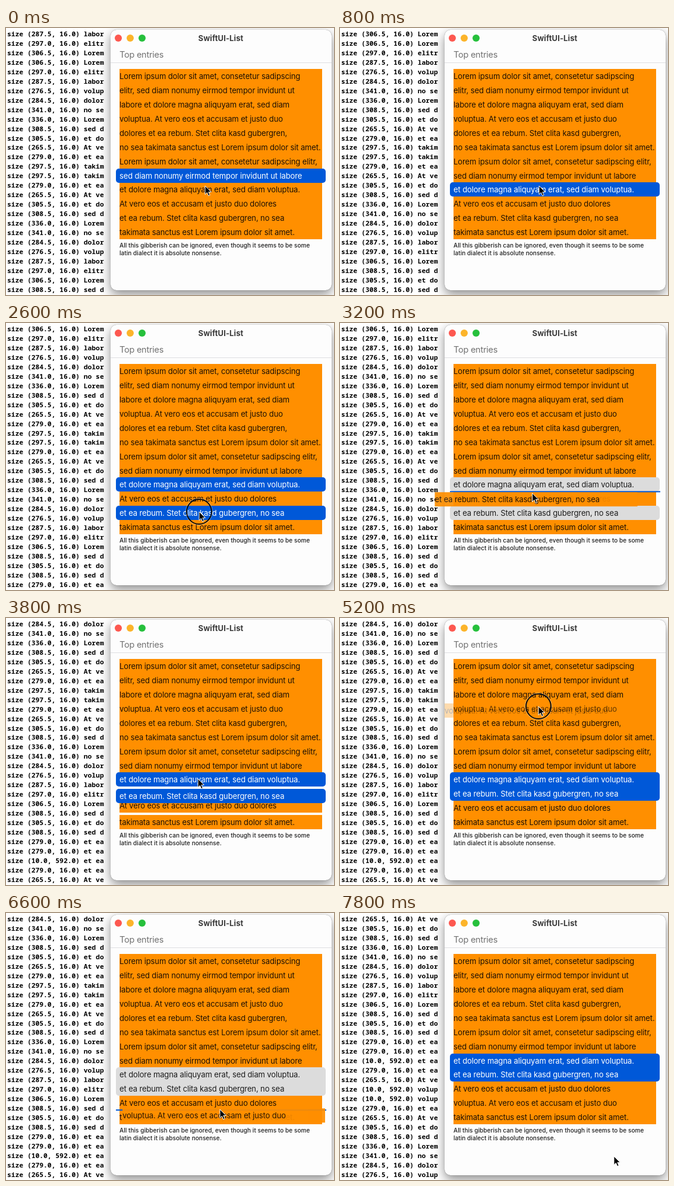
An HTML page that plays this animation: 552x450 px, repeating every 8 s.

```html
<!DOCTYPE html>
<html lang="en">
<head>
<meta charset="utf-8">
<title>List reordering</title>
<style>
  html, body { margin: 0; width: 100%; height: 100%; overflow: hidden; background: #fff; }
  #stage { position: relative; width: 552px; height: 450px; overflow: hidden; font-family: Inter, "Open Sans", sans-serif; color: #1c1004; }
  #stage div, #log, svg { position: absolute; white-space: pre; }
  #log { left: 2px; top: 2.2px; margin: 0; color: #000; font: bold 11.3px/15.93px "Noto Sans Mono", monospace; }
  #window {
    left: 176px; top: 3px; width: 372px; height: 439px; border-radius: 10px; background: #fdfdfd;
    box-shadow: 0 0 1px rgba(0, 0, 0, .5), 0 7px 18px rgba(0, 0, 0, .45);
  }
  .light { top: 11px; width: 12px; height: 12px; border-radius: 50%; }
  #title { left: 176px; width: 371px; top: 7px; text-align: center; font: bold 13px/20px Inter, sans-serif; letter-spacing: .1px; color: #3a3a3a; }
  #heading { left: 191px; top: 35px; font-size: 14.5px; line-height: 20px; letter-spacing: -.25px; color: #727272; }
  #rule { left: 176px; top: 58px; width: 372px; height: 1px; background: #dedee2; }
  .row { left: 191px; top: 0; width: 341px; height: 24px; background: #ff8f00; font-size: 13px; line-height: 24px; letter-spacing: -.12px; }
  .row.picked { left: 185px; width: 347px; padding-left: 6px; z-index: 1; border-radius: 5px; background: #0058d8; color: #fff; }
  .row.idle { background: #dcdcdc; color: #1c1c1c; }
  .row.joinUp { border-top-left-radius: 0; border-top-right-radius: 0; }
  .row.joinDown { border-bottom-left-radius: 0; border-bottom-right-radius: 0; }
  #note { left: 191px; top: 359.5px; font-size: 10px; font-weight: 500; line-height: 13px; letter-spacing: .05px; color: #1c1c1c; }
  #marker { left: 185px; top: 0; width: 354px; height: 2px; background: #0058d8; z-index: 2; }
  #ghost { left: 0; z-index: 3; }
  #ring {
    left: -22px; top: -22px; width: 40px; height: 40px; border: 2px solid #0c0c0c; border-radius: 50%;
    box-shadow: 0 0 0 1px rgba(255, 255, 255, .4); z-index: 4;
  }
  #cursor { left: -1px; top: -1px; z-index: 5; overflow: visible; }
</style>
</head>
<body>
<div id="stage">
  <pre id="log"></pre>
  <div id="window"></div>
  <div class="light" style="left:183px;background:#fd5850"></div>
  <div class="light" style="left:203px;background:#fcb42a"></div>
  <div class="light" style="left:223px;background:#26c03c"></div>
  <div id="title">SwiftUI-List</div>
  <div id="heading">Top entries</div>
  <div id="rule"></div>
  <div id="note">All this gibberish can be ignored, even though it seems to be some
latin dialect it is absolute nonsense.</div>
  <div id="marker"></div>
  <div id="ghost" class="row"></div>
  <div id="ring"></div>
  <svg id="cursor" width="14" height="20">
    <path d="M1 1V15.5L4.4 12.3L6.7 17.8L9.2 16.7L6.9 11.4H11.4Z" fill="#000" stroke="#fff" stroke-width="1"/>
  </svg>
</div>
<script>
const LOOP = 8000, STEP = 200, TOP = 69.2, PITCH = 23.9, LOG_ROWS = 28;
const $ = id => document.getElementById(id);

const entries = [
  ["Lorem ipsum dolor sit amet, consetetur sadipscing", 306.5],
  ["elitr, sed diam nonumy eirmod tempor invidunt ut", 297],
  ["labore et dolore magna aliquyam erat, sed diam", 287.5],
  ["voluptua. At vero eos et accusam et justo duo", 276.5],
  ["dolores et ea rebum. Stet clita kasd gubergren,", 284.5],
  ["no sea takimata sanctus est Lorem ipsum dolor sit amet.", 341],
  ["Lorem ipsum dolor sit amet, consetetur sadipscing elitr,", 336],
  ["sed diam nonumy eirmod tempor invidunt ut labore", 308.5],
  ["et dolore magna aliquyam erat, sed diam voluptua.", 305.5],
  ["At vero eos et accusam et justo duo dolores", 265.5],
  ["et ea rebum. Stet clita kasd gubergren, no sea", 279],
  ["takimata sanctus est Lorem ipsum dolor sit amet.", 297.5]
];

// Log lines
const logLine = (i, size) => `size (${size}) ${entries[i][0].slice(0, 5)}`;
const fitted = i => logLine(i, entries[i][1].toFixed(1) + ", 16.0");
const tall = i => logLine(i, "10.0, 592.0");
const down = entries.map((_, i) => i), up = [...down].reverse();
const logLines = [
  ...[2, 1, 0, ...down, ...up, 7, 8, 7, 10, 10].map(fitted),
  tall(10), fitted(10), fitted(9), tall(3), tall(3),
  ...up.slice(1, 9).map(fitted)
];
const logCounts = [[0, 28], [400, 30], [2600, 31], [3600, 35], [7000, 45]];

// Row orders before and after each drop
const orders = [
  down,
  [0, 1, 2, 3, 4, 5, 6, 7, 8, 10, 9, 11],
  [0, 1, 2, 4, 5, 6, 7, 8, 10, 9, 3, 11]
];
const drags = [
  { row: 10, start: 2800, drop: 3600 },
  { row: 3, start: 5200, drop: 7000 }
];
const presses = [[400, 600], [2400, 3000], [5000, 5400]];
const selections = [[0, [7]], [400, [8]], [2600, [8, 10]]];
const cursorPath = [
  [0, 335, 266], [800, 335, 266], [1600, 314, 313], [2400, 325, 318], [2800, 325, 318],
  [3400, 323, 276], [3800, 323, 271], [4200, 323, 271], [5000, 334, 149], [5200, 334, 149],
  [6600, 360, 331], [7000, 360, 331], [7600, 461, 410]
];

const clamp = v => Math.min(1, Math.max(0, v));
const lerp = (a, b, k) => a + (b - a) * k;
const latest = (list, t) => list.filter(([at]) => at <= t).pop()[1];
const move = (el, x, y) => el.style.transform = `translate(${x}px, ${y}px)`;
const show = (el, on) => el.style.visibility = on ? "visible" : "hidden";

function cursorAt(t) {
  const next = cursorPath.findIndex(([at]) => at > t);
  if (next < 0) return cursorPath[cursorPath.length - 1].slice(1);
  const [t0, x0, y0] = cursorPath[next - 1], [t1, x1, y1] = cursorPath[next];
  const u = (t - t0) / (t1 - t0), k = u * u * (3 - 2 * u);
  return [lerp(x0, x1, k), lerp(y0, y1, k)];
}

function slotOf(i, t) {
  return drags.reduce((slot, { drop }, n) => {
    const u = clamp((t - drop) / 340);
    return lerp(slot, orders[n + 1].indexOf(i), 1 - (1 - u) ** 2);
  }, i);
}

const rows = entries.map(([text]) => {
  const row = document.createElement("div");
  row.textContent = text;
  $("stage").insertBefore(row, $("note"));
  return row;
});

function draw(t) {
  const count = latest(logCounts, t);
  $("log").textContent = logLines.slice(count - LOG_ROWS, count).join("\n");

  const [x, y] = cursorAt(t);
  move($("cursor"), x, y);
  move($("ring"), x, y);
  show($("ring"), presses.some(([from, to]) => t >= from && t < to));

  const drag = drags.find(d => t >= d.start && t < d.drop);
  const fade = drag ? clamp((t - drag.start + 200) / 600) : 0;
  const dragging = fade > .4;
  show($("ghost"), drag);
  show($("marker"), dragging);
  if (drag) {
    $("ghost").textContent = entries[drag.row][0];
    $("ghost").style.opacity = fade * .92;
    move($("ghost"), x - 155 - 9 * fade, y - 6.7 + 5 * fade);
    move($("marker"), 0, TOP + PITCH * Math.round((y - TOP) / PITCH) - 1);
  }

  const picked = latest(selections, t);
  const slots = rows.map((_, i) => slotOf(i, t));
  const joins = (i, step) => picked.some(j => Math.abs(slots[j] - slots[i] - step) < .01);
  rows.forEach((row, i) => {
    const on = picked.includes(i);
    row.className = "row";
    row.classList.toggle("picked", on);
    row.classList.toggle("idle", on && dragging);
    row.classList.toggle("joinUp", on && joins(i, -1));
    row.classList.toggle("joinDown", on && joins(i, 1));
    move(row, 0, Math.round(TOP + PITCH * slots[i])); // whole pixels leave no seams
  });
}

let shown = -1;
function tick() {
  const t = Math.floor(performance.now() % LOOP / STEP) * STEP;
  if (t !== shown) draw(shown = t);
  requestAnimationFrame(tick);
}
tick();
</script>
</body>
</html>
```
